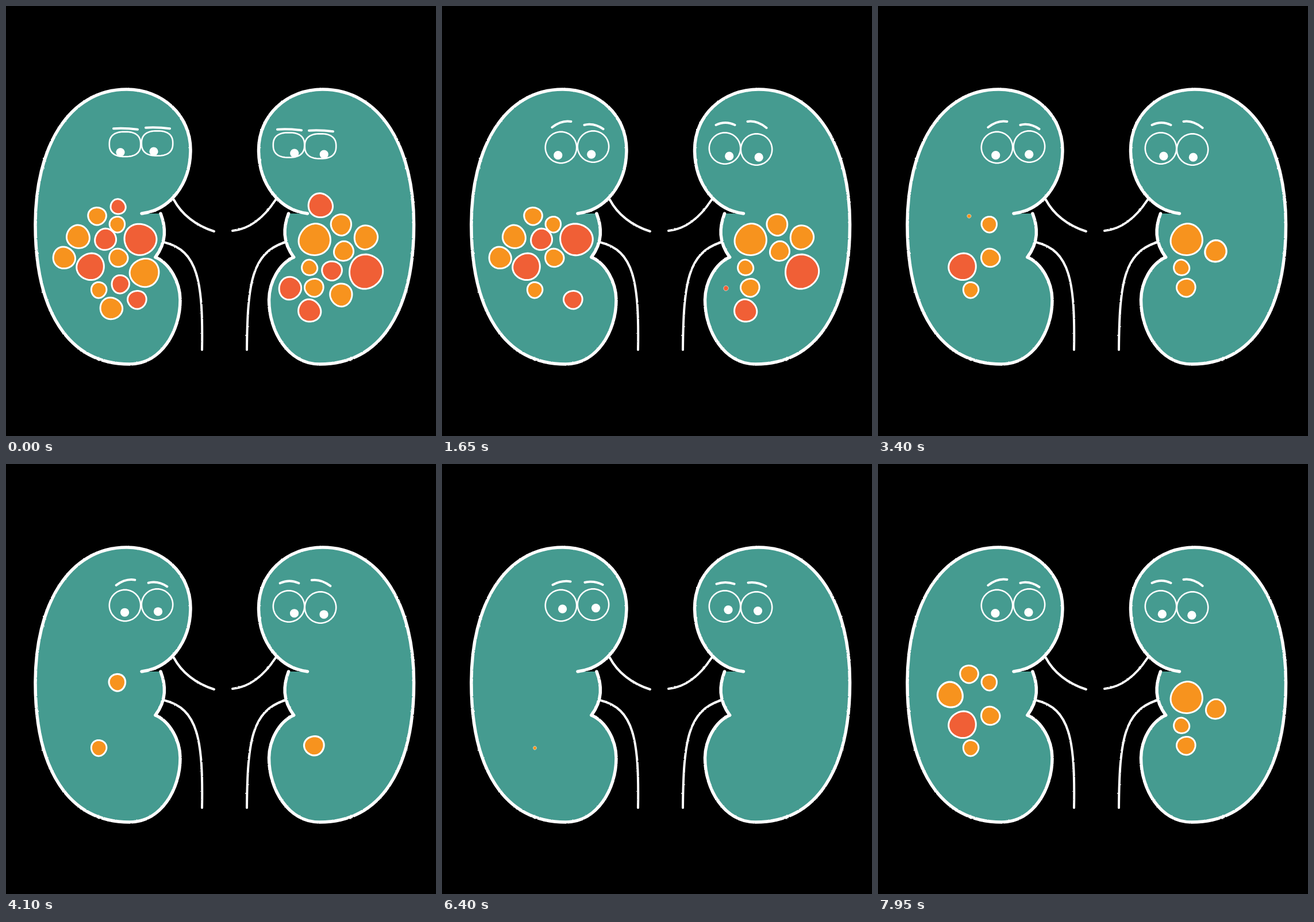
An HTML page that plays this animation: 748x748 px, repeating every 8 s.

```html
<!DOCTYPE html>
<html lang="en">
<head>
<meta charset="utf-8">
<title>Kidneys</title>
<style>
  html, body { margin: 0; width: 100%; height: 100%; overflow: hidden; background: #000; }
  svg { display: block; width: 100vw; height: 100vh; }
  .line { fill: none; stroke: #fff; stroke-linecap: round; stroke-linejoin: round; }
</style>
</head>
<body>
<svg viewBox="0 0 748 748">
  <defs>
    <filter id="chalk" filterUnits="userSpaceOnUse" x="0" y="0" width="748" height="748" color-interpolation-filters="sRGB">
      <feTurbulence type="fractalNoise" baseFrequency="0.25" numOctaves="2" seed="4"/>
      <feDisplacementMap in="SourceGraphic" scale="2" xChannelSelector="R" yChannelSelector="G"/>
    </filter>
    <path id="body" d="M236,361 C285,355 321,310 321,250 C321,190 272,145 210,145 C108,145 51,247 51,380
      C51,530 108,623 215,623 C270,623 303,565 303,512 C303,480 285,448 260,437"/>
    <path id="bulge" d="M260,437 C280,410 278,385 269,361"/>
    <g id="kidney">
      <path fill="#459b90" d="M236,361 C285,355 321,310 321,250 C321,190 272,145 210,145 C108,145 51,247 51,380
        C51,530 108,623 215,623 C270,623 303,565 303,512 C303,480 285,448 260,437 C280,410 278,385 269,361 Z"/>
      <g class="line" stroke-width="5.5" filter="url(#chalk)"><use href="#body"/><use href="#bulge"/></g>
    </g>
  </defs>
  <g class="line" stroke-width="4" filter="url(#chalk)">
    <path d="M292,337 C305,362 330,382 362,392 M275,411 C334,425 343,480 341,598"/>
    <path d="M469,337 C450,366 425,388 394,391 M485,411 C428,430 420,480 419,598"/>
  </g>
  <use href="#kidney"/>
  <use href="#kidney" transform="translate(760.5 0) scale(-1 1)"/>
  <g id="cysts"></g>
  <g id="faces"></g>
</svg>
<script>
const LOOP = 8000, STEP = 50, TURN = 5450, SHRINK = 300;
const ORANGE = '#f7931e', RED = '#f05f36';

const el = (parent, tag, attrs) => {
  const node = document.createElementNS('http://www.w3.org/2000/svg', tag);
  for (const key in attrs) node.setAttribute(key, attrs[key]);
  return document.getElementById(parent).appendChild(node);
};
const clamp = u => Math.max(0, Math.min(1, u));
const mix = (a, b, u) => a + (b - a) * u;
const ease = (t, from, to) => (1 - Math.cos(Math.PI * clamp((t - from) / (to - from)))) / 2;

// Closed path sampled from a function of the angle.
function ring(point, count = 72) {
  const pts = Array.from({ length: count }, (_, i) =>
    point(i / count * Math.PI * 2).map(v => v.toFixed(2)));
  return 'M' + pts.join('L') + 'Z';
}
const blob = (radius, seed) => ring(a => {
  const r = radius * (1 + 0.02 * Math.sin(2 * a + seed) + 0.02 * Math.sin(3 * a + seed * 2));
  return [r * Math.cos(a), r * Math.sin(a)];
});

// Each side loses its cysts in list order, at a steady pace with one pause after the eighth.
const sides = [
  { first: 665, step: 275, pause: 275, cysts: [
    [183,526,19,ORANGE], [195,349,13,RED], [241,464,25,ORANGE], [199,484,15.5,RED],
    [233.5,406,27.5,RED], [173,406,18.5,RED], [101,438,19,ORANGE], [228,511,16,RED],
    [125.5,401.5,20,ORANGE], [158.5,365.5,15.5,ORANGE], [195.5,438,16,ORANGE],
    [147,453.5,23.5,RED], [193.5,380,13.5,ORANGE], [161.5,494,13.5,ORANGE]] },
  { first: 897, step: 256, pause: 615, cysts: [
    [547,347,21,RED], [567,460.5,17,RED], [583,502.5,19.5,ORANGE], [494,491,19.5,RED],
    [583,380.5,18,ORANGE], [626,402.5,20.5,ORANGE], [626,462,29.5,RED], [528,530,19.5,RED],
    [587.5,426.5,17,ORANGE], [537,406.5,27.5,ORANGE], [528,455,13.5,ORANGE], [536,490,16,ORANGE]] }
];
const cysts = sides.flatMap(({ first, step, pause, cysts }) => cysts.map(([x, y, r, fill], k) => ({
  x, y,
  start: first + step * k + (k < 8 ? 0 : pause) - SHRINK,
  node: el('cysts', 'path', { d: blob(r, x), fill, stroke: '#fff', 'stroke-width': 3 })
})));

const drift = t => 199 + 0.0017 * t + 4.6 * ease(t, 3850, 4950);
const sway = t => 498 + 3.7 * Math.cos(Math.PI * t / 1000);
const eyes = [
  { cx: 207, cy: 246, lift: 40, tilt: -5, look: drift },
  { cx: 263, cy: 244.5, lift: 34, tilt: 3.5, look: t => drift(t) + 58 },
  { cx: 492, cy: 247.5, lift: 40.5, tilt: 0, look: sway },
  { cx: 547, cy: 249.5, lift: 43, tilt: 5.5, look: t => sway(t) + 51.5 }
].map(eye => ({
  ...eye,
  rim: el('faces', 'path', { class: 'line', 'stroke-width': 2.6 }),
  brow: el('faces', 'path', { class: 'line', 'stroke-width': 4 }),
  pupil: el('faces', 'circle', { r: 7.6, fill: '#fff' })
}));

function rimPath(cx, cy, wide) {
  const bottom = mix(16, 27.2, wide), mid = (bottom - 27.2) / 2, half = (bottom + 27.2) / 2;
  const power = 2 / mix(2.5, 2, wide);
  const soft = v => Math.sign(v) * Math.abs(v) ** power;
  return ring(a => [cx + 27.2 * soft(Math.cos(a)), cy + mid + half * soft(Math.sin(a))]);
}

function browPath(x, y, half, tilt, arch) {
  return `M${x - half},${y - tilt}Q${x},${y - arch} ${x + half},${y + tilt}`;
}

function draw(ms) {
  const now = Math.floor(ms % LOOP / STEP) * STEP;
  const t = now < TURN ? now : 2 * TURN - now;   // the second half plays backwards
  const wide = ease(t, 400, 1200), up = ease(t, 3850, 4950);
  const pose = (squint, open, raised) => mix(mix(squint, open, wide), raised, up);

  for (const { x, y, start, node } of cysts) {
    const u = clamp((t - start) / SHRINK);
    const scale = 1 - u * u * (2.7 * u - 1.7);
    node.setAttribute('visibility', u < 1 ? 'visible' : 'hidden');
    node.setAttribute('transform', `translate(${x} ${y}) scale(${scale})`);
  }
  for (const { cx, cy, lift, tilt, look, rim, brow, pupil } of eyes) {
    rim.setAttribute('d', rimPath(cx, cy, wide));
    brow.setAttribute('d', browPath(cx + 1, cy - pose(32, lift, 38),
      pose(21, 16.5, 15), pose(0.8, tilt, tilt / 3), pose(2, 8, 4)));
    pupil.setAttribute('cx', look(Math.min(t, 4950)));
    pupil.setAttribute('cy', cy + pose(8.5, 13.7, 1.8));
  }
}

const began = performance.now();
function tick() {
  draw(performance.now() - began);
  requestAnimationFrame(tick);
}
tick();
</script>
</body>
</html>
```
